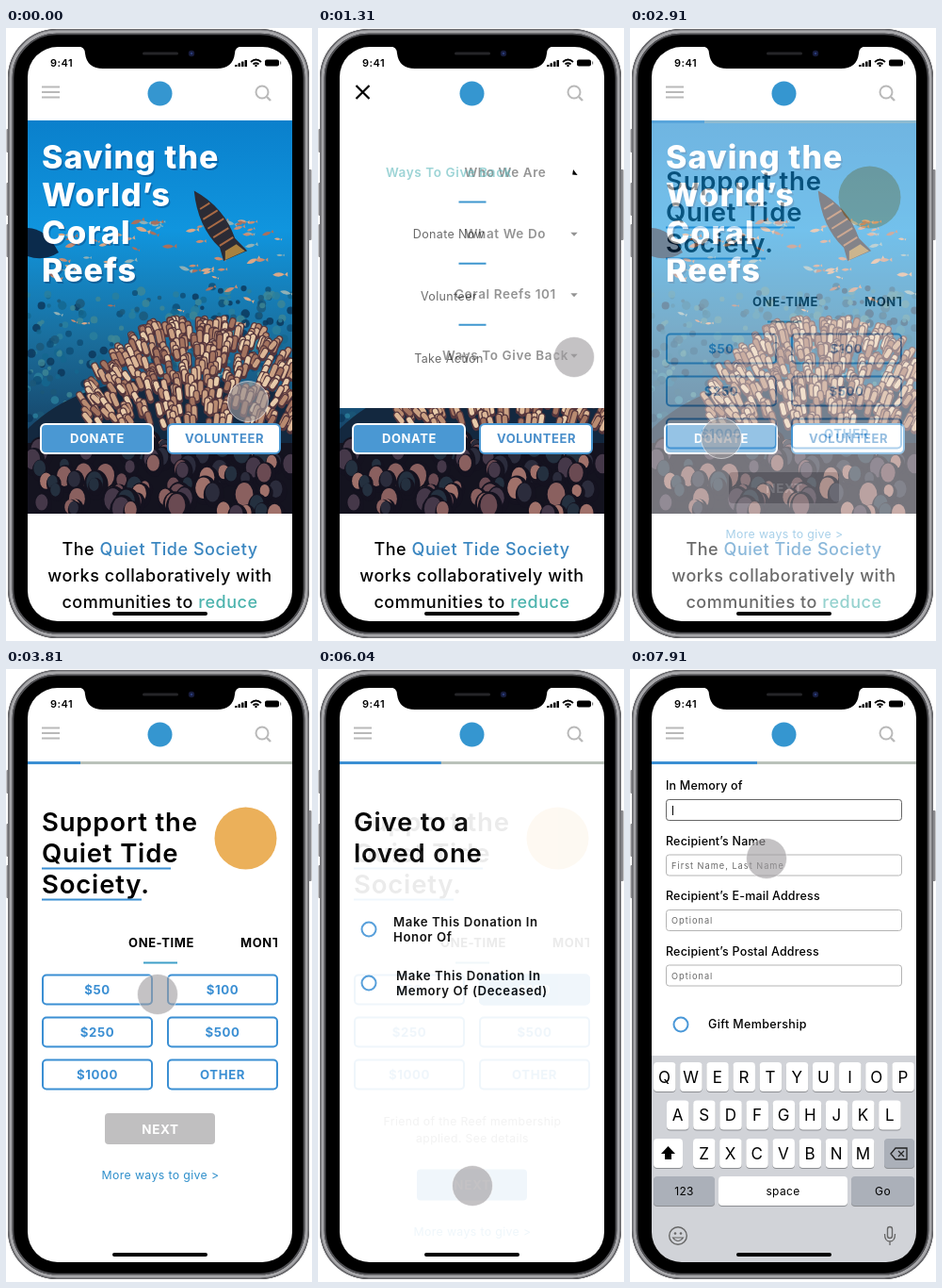
An HTML page for the animation above (7.99 s loop, 325 by 650 pixels).

```html
<!DOCTYPE html>
<html lang="en">
<head>
<meta charset="utf-8">
<title>Reef charity app</title>
<style>
html, body { margin: 0; width: 100%; height: 100%; overflow: hidden; background: #fff; }
svg { display: block; width: 325px; height: 650px; font-family: Inter, "Open Sans", sans-serif; }
text { white-space: pre; }
</style>
</head>
<body>
<script>
const LOOP = 7990, BLUE = '#3b8fd3', GRAY = '#b9b9b9';

// Markup helpers
const text = (x, y, s, size, weight = 400, fill = '#000', anchor = 'start', spacing = weight > 500 ? .045 : .03) =>
  `<text x="${x}" y="${y}" font-size="${size}" font-weight="${weight}" fill="${fill}" text-anchor="${anchor}" letter-spacing="${spacing * size}">${s}</text>`;
const mid = (x, y, s, size, weight, fill) => text(x, y, s, size, weight, fill, 'middle');
const box = (x, y, w, h, fill, r = 0, more = '') =>
  `<rect x="${x}" y="${y}" width="${w}" height="${h}" rx="${r}" fill="${fill}" ${more}/>`;
const dot = (x, y, r, fill, more = '') => `<circle cx="${x}" cy="${y}" r="${r}" fill="${fill}" ${more}/>`;
const line = (d, color, w = 2, more = '') => `<path d="${d}" stroke="${color}" stroke-width="${w}" fill="none" ${more}/>`;
const group = (id, body, more = '') => `<g id="${id}" ${more}>${body}</g>`;
const outlined = (color, w = 2) => `stroke="${color}" stroke-width="${w}"`;
const range = (n, f) => Array.from({ length: n }, (_, i) => f(i)).join('');

let seed = 7;
const rnd = (a, b) => {
  seed = seed * 16807 % 2147483647;
  return a + (b - a) * seed / 2147483647;
};
const pick = list => list[Math.floor(rnd(0, list.length))];

function fish(x, y, size, turn, fill) {
  return `<path transform="translate(${x} ${y}) rotate(${turn}) scale(${size})" fill="${fill}" d="M-1 0Q0-.7 1 0L1.5-.4V.4L1 0Q0 .7-1 0"/>`;
}

function reef() {
  const far = range(420, i => {
    const x = rnd(23, 304), y = 272 + i * .4 + rnd(0, 12);
    return dot(x, y, rnd(2, 5), pick(['#14668f', '#2a7f9c', '#0e4c74', '#3f8795', '#0b3557', '#1b5878']), 'opacity=".8"');
  });
  const school = range(75, () =>
    fish(rnd(28, 300), 205 + rnd(0, 1) * rnd(0, 170), rnd(3, 6.5), rnd(-25, 25), pick(['#c98d72', '#a9705d', '#8fb0b6', '#d9a888'])));
  // Branching coral: short rounded fingers inside a dome, back to front
  const fingers = range(420, i => {
    const y = 308 + i * .26, half = 126 * Math.sqrt(Math.max(.05, 1 - ((415 - y) / 112) ** 2));
    const x = 206 + rnd(-half, half), lean = (x - 206) / 22, h = rnd(6, 12);
    const tone = pick(['#cba183', '#dcb797', '#b88a70', '#a3735f', '#e8cbaa']);
    return line(`M${x} ${y + h}L${x + lean} ${y}`, '#55363c', 7.5, 'stroke-linecap="round"') +
      line(`M${x} ${y + h - 2}L${x + lean} ${y}`, tone, 5, 'stroke-linecap="round"');
  });
  const rocks = range(85, i => {
    const x = rnd(23, 304), y = 438 + i * .95, r = rnd(7, 14);
    return `<ellipse cx="${x}" cy="${y}" rx="${r}" ry="${r * 1.25}" fill="#14121f"/>` +
      `<ellipse cx="${x - 1.5}" cy="${y - 2.5}" rx="${r * .68}" ry="${r * .9}" fill="${pick(['#6a4a52', '#8a605f', '#453849', '#2b2c3c', '#a0716a', '#24303f'])}"/>`;
  });
  const bigFish = `<g transform="translate(222 208) rotate(58)">
    <path d="M-42 0Q-10-18 24-10L42-14 38 13 24 9Q-8 17-42 0" fill="#2b2b35"/>
    <path d="M-22-7V5M-11-10V8M0-11V9M11-10V9M22-9V8" stroke="#a86a45" stroke-width="2"/>
    <path d="M30-8L41-12 38 11 30 6" fill="#a8813f"/></g>`;
  return `<g clip-path="url(#photo)">` + box(23, 98, 281, 417, 'url(#sea)') + far + school +
    '<path d="M23 425Q110 340 304 390V515H23" fill="#13283f"/>' +
    fingers + box(23, 440, 281, 75, '#14131f') + rocks + bigFish +
    '<path d="M23 212Q42 212 56 238 40 248 23 242" fill="#0b2b4c"/></g>';
}

function home() {
  const hero = ['Saving the', 'World’s', 'Coral', 'Reefs'];
  const write = (dx, fill) => hero.map((s, i) => text(38 + dx, 149 + dx + i * 40, s, 34, 800, fill, 'start', .03)).join('');
  const span = (s, c) => `<tspan fill="${c}">${s}</tspan>`;
  return box(23, 20, 281, 610, '#fff') + reef() +
    `<g opacity=".25">${write(1.5, '#003')}</g>` + write(0, '#fff') +
    box(37, 420, 119, 31, '#4a98d3', 5, outlined('#fff')) + mid(97, 440, 'DONATE', 13, 700, '#fff') +
    box(172, 420, 119, 31, '#fff', 5, outlined('#4a98d3')) + mid(232, 440, 'VOLUNTEER', 13, 700, '#4a8fcb') +
    mid(163.5, 559, 'The ' + span('Quiet Tide Society', '#3a86c0'), 18, 500) +
    mid(163.5, 587, 'works collaboratively with', 18, 500) +
    mid(163.5, 615, 'communities to ' + span('reduce', '#4cb3ad'), 18, 500);
}

function menu() {
  const items = ['Who We Are', 'What We Do', 'Coral Reefs 101', 'Ways To Give Back'];
  const links = ['Donate Now', 'Volunteer', 'Take Action'];
  const caret = '<path d="M-3.7-1.7H3.700L0 2.300Z"/>';
  return box(23, 98, 281, 305, '#fff') +
    group('main', items.map((s, i) => mid(164, 158 + i * 64.5, s, 13.5, 600)).join('')) +
    group('carets', range(3, i => `<g transform="translate(272 ${218.5 + i * 64.5})">${caret}</g>`)) +
    group('backCaret', caret) +
    group('sub', mid(164, 158, items[3], 13.5, 600, '#56b5b8') +
      links.map((s, i) => mid(164, 223 + i * 66, s, 12.5)).join('')) +
    line('', '#3f97cf', 2, 'id="rules"');
}

const nextButton = (y, fill) => box(105, y, 117, 33, fill, 4) + mid(164, y + 21.5, 'NEXT', 13.5, 700, '#fff') +
  mid(164, y + 70, 'More ways to give &gt;', 12.3, 400, '#2f8fcb');

function amount(i, s, on) {
  const x = 39 + i % 2 * 133, y = 324.5 + (i >> 1) * 45;
  return box(x, y, 116, 31, on ? BLUE : '#fff', 4, outlined(BLUE)) + mid(x + 58, y + 20, s, 13.2, 700, on ? '#fff' : BLUE);
}

function donate() {
  const sums = ['$50', '$100', '$250', '$500', '$1000', 'OTHER'];
  const lines = ['Support the', 'Quiet Tide', 'Society.'];
  return box(23, 98, 281, 532, '#fff') +
    lines.map((s, i) => text(38, 172 + i * 33, s, 27.5, 600, '#000', 'start', .03)).join('') +
    line('M38 211.5H175M38 244.5H144', BLUE) + dot(254.5, 179.5, 33, '#ebb05a') +
    mid(165, 294.5, 'ONE-TIME', 13, 700) +
    `<g clip-path="url(#tabs)">${text(249, 294.5, 'MONTHLY', 13, 700)}</g>` +
    line('M146 311.5H182', '#3f9fc8') + sums.map((s, i) => amount(i, s)).join('') +
    group('plain', nextButton(471, '#c0bfc0')) +
    group('chosen', box(38, 460, 251, 150, '#fff') + amount(1, '$100', true) +
      mid(164, 484, 'Friend of the Reef membership', 12.2, 400, '#666') +
      mid(164, 502, 'applied. See details', 12.2, 400, '#666') + nextButton(530.5, BLUE));
}

function gift() {
  const radio = y => dot(54, y, 7.5, '#fff', outlined('#4a98d8'));
  const fields = [['In Memory of', 'First Name, Last Name'], ['Recipient’s Name', 'First Name, Last Name'],
    ['Recipient’s E-mail Address', 'Optional'], ['Recipient’s Postal Address', 'Optional']];
  const form = dot(54, 333, 6, '#4392dc') +
    text(83, 364.5, 'We will notify your recipient to let them know', 9, 400, '#777', 'start', .01) +
    text(83, 375, 'of your generous donation.', 9, 400, '#777', 'start', .01) +
    fields.map(([label, hint], i) => {
      const y = i * 58.5;
      return text(38, 404 + y, label, 12.5, 500, '#000', 'start', .015) +
        box(38.5, 414.5 + y, 250, 22, '#fff', 3, outlined('#b4b4b4', 1)) +
        text(44, 429 + y, hint, 9.2, 400, '#666', 'start', .11);
    }).join('') + radio(653) + text(83, 657, 'Gift Membership', 12.5, 500) +
    group('focus', box(38.5, 414.5, 250, 22, '#fff', 3, outlined('#666', 1)) + line('M45.5 421V431', '#000', 1));
  return box(23, 98, 281, 532, '#fff') +
    group('scroll', text(38, 172, 'Give to a', 27.5, 600, '#000', 'start', .03) +
      text(38, 205, 'loved one', 27.5, 600, '#000', 'start', .03) +
      radio(276) + text(80, 273, 'Make This Donation In', 13.2, 600) + text(80, 289, 'Honor Of', 13.2, 600) +
      radio(333) + text(83, 330, 'Make This Donation In', 13.2, 600) +
      text(83, 346, 'Memory Of (Deceased)', 13.2, 600) + group('form', form));
}

function header() {
  return box(23, 20, 281, 78, '#fff') + mid(59, 41, '9:41', 11, 600) +
    range(4, i => box(243 + i * 3.5, 39 - i * 1.7, 2.5, 2 + i * 1.7, '#000', .5)) +
    line('M260 36Q265.5 31 271 36M262.5 38.5Q265.5 36 268.5 38.5', '#000', 1.8) + dot(265.5, 40, 1.2, '#000') +
    box(275, 33.5, 15, 7, '#000', 2) + box(291, 35.5, 1.2, 3, '#777') +
    group('bars', line('M38 62.5H57M38 68H57M38 73.5H57', GRAY)) +
    group('cross', line('M40.5 61L54.5 75M54.5 61L40.5 75', '#000', 2.2)) +
    dot(163.5, 69.5, 13, '#3596d0') + dot(272, 68, 6.5, 'none', outlined(GRAY)) + line('M277 73L281 77', GRAY, 2.4) +
    group('progress', box(23, 98, 281, 3, '#bac2ba') + box(23, 98, 56, 3, BLUE, 0, 'id="bar"'));
}

function keyboard() {
  const key = (x, y, w, s, size = 17, fill = '#fff') =>
    box(x, y + 1, w, 31, '#8c8e92', 4) + box(x, y, w, 31, fill, 4) + mid(x + w / 2, y + 15.5 + size * .36, s, size);
  const row = (letters, x, y) => [...letters].map((c, i) => key(x + i * 28.15, y, 23.5, c)).join('');
  const dark = '#abb0b9';
  return box(23, 410, 281, 220, '#d1d3d8') +
    row('QWERTYUIOP', 25, 417) + row('ASDFGHJKL', 39, 457.5) + row('ZXCVBNM', 67, 498) +
    key(25, 498, 31, '') + '<path d="M40.5 506L48 514H44V520H37V514H33Z"/>' +
    key(270, 498, 32, '', 17, dark) +
    line('M277 514L282 508H294V520H282ZM285 511L291 517M291 511L285 517', '#222', 1.3) +
    key(25, 538, 65, '123', 12, dark) + key(94, 538, 137, 'space', 12) + key(235, 538, 67, 'Go', 12, dark) +
    dot(51, 601, 9.3, 'none', outlined('#666', 1.4)) + dot(48, 598.5, 1.3, '#666') + dot(54, 598.5, 1.3, '#666') +
    line('M45.5 603Q51 610 56.5 603Z', '#666', 1.2) +
    box(273.5, 591.5, 5, 12, 'none', 2.5, outlined('#666', 1.4)) + line('M270.5 599Q270.5 607 276 607T281.5 599M276 607V611', '#666', 1.3);
}

function phone() {
  const rr = (x, y, w, h, r) =>
    `M${x + r} ${y}h${w - 2 * r}a${r} ${r} 0 0 1 ${r} ${r}v${h - 2 * r}a${r} ${r} 0 0 1-${r} ${r}h${2 * r - w}a${r} ${r} 0 0 1-${r}-${r}v${2 * r - h}a${r} ${r} 0 0 1 ${r}-${r}z`;
  return [[0, 107, 25], [0, 164, 35], [0, 208, 35], [320, 150, 75]].map(([x, y, h]) => box(x + .5, y, 4, h, '#8a8a8e', 1)).join('') +
    `<path fill-rule="evenodd" d="${rr(2, 1, 320, 646, 52)}${rr(23, 20, 281, 609, 32)}"/>` +
    box(2.7, 1.7, 318.6, 644.6, 'none', 51, outlined('#6c6c70', 1.4)) +
    box(5, 4, 314, 640, 'none', 49, outlined('#a6a6a9', 3.4)) +
    box(7.5, 6.5, 309, 635, 'none', 46.5, outlined('#505054', 1.6)) +
    '<path d="M76 19Q84 20 84 27 86 43 103 43H224Q241 43 243 27 243 20 251 19Z"/>' +
    box(145, 25.5, 38, 3, '#252528', 1.5) + dot(197, 27, 3.2, '#171c3c') + dot(197, 27, 1.3, '#2a3c78');
}

document.body.innerHTML = `<svg viewBox="0 0 325 650"><defs>
  <linearGradient id="sea" x2="0" y2="1"><stop stop-color="#0a80cc"/><stop offset=".28" stop-color="#1095de"/><stop offset=".55" stop-color="#1a6f9e"/><stop offset="1" stop-color="#14213a"/></linearGradient>
  <clipPath id="screen">${box(23, 20, 281, 609, '#000', 32)}</clipPath>
  <clipPath id="photo">${box(23, 98, 281, 417, '#000')}</clipPath>
  <clipPath id="tabs">${box(38, 280, 250, 24, '#000')}</clipPath></defs>
  <g clip-path="url(#screen)">${home()}${group('menu', menu())}${group('donate', donate())}${group('gift', gift())}
  ${header()}${group('keys', keyboard())}${box(113, 619, 101, 4, '#000', 2)}</g>
  ${phone()}${group('touch', dot(0, 0, 21.5, '#a19da1', 'fill-opacity=".62" stroke="#fff" stroke-opacity=".55"'))}</svg>`;

const el = Object.fromEntries([...document.querySelectorAll('g[id], #rules, #bar')].map(e => [e.id, e]));
const ease = (t, a, b) => {
  const u = Math.min(1, Math.max(0, (t - a) / (b - a)));
  return u * u * (3 - 2 * u);
};
const fade = (id, p) => {
  el[id].style.opacity = p;
  el[id].style.display = p > 0 ? '' : 'none';
};
const move = (id, x, y, more = '') => el[id].setAttribute('transform', `translate(${x} ${y})${more}`);

// Touch point: time, x, y
const path = [[70, 257, 396], [440, 47, 68], [1000, 47, 68], [1190, 272, 349], [1590, 272, 349], [1800, 272, 153],
  [2430, 97, 480], [2680, 97, 435], [3660, 97, 435], [3810, 161, 345], [4430, 190, 380], [4510, 190, 380],
  [5030, 234, 341], [5270, 234, 341], [5660, 164, 548], [6130, 164, 548], [6350, 54, 333], [6750, 54, 333],
  [6910, 134, 433], [7610, 134, 433], [7910, 145, 201]];

function touchAt(t) {
  const i = path.findIndex(k => k[0] > t);
  if (i < 1) return path.at(i).slice(1);
  const [a, b] = [path[i - 1], path[i]], p = ease(t, a[0], b[0]);
  return [1, 2].map(k => a[k] + (b[k] - a[k]) * p);
}

function draw(t) {
  const open = ease(t, 750, 1000) - ease(t, 2220, 2370);
  const sub = ease(t, 1200, 1400) - ease(t, 1830, 2050);
  fade('menu', open > 0 ? 1 : 0);
  move('menu', 0, 305 * (open - 1));
  fade('main', 1 - sub);
  move('main', 60 * sub, 0);
  fade('carets', 1 - sub);
  fade('sub', sub);
  move('sub', -60 * (1 - sub), 0);
  move('backCaret', 272, 154, ` rotate(${90 * sub})`);
  const half = 18 - 6 * sub;
  el.rules.setAttribute('d', [0, 1, 2].map(i =>
    `M${164 - half} ${184 + i * 64.5 + sub * (1 + i)}h${2 * half}`).join(''));
  fade('cross', open > .5 ? 1 : 0);
  fade('bars', open > .5 ? 0 : 1);

  const giving = ease(t, 2800, 3050), next = ease(t, 5850, 6080);
  fade('donate', giving);
  fade('progress', giving);
  fade('chosen', ease(t, 5120, 5370));
  fade('gift', next);
  el.bar.setAttribute('width', 56 + 56 * next);
  fade('form', ease(t, 6400, 6600));

  const typing = ease(t, 6980, 7220);
  move('scroll', 0, -276 * typing);
  fade('keys', typing > 0 ? 1 : 0);
  move('keys', 0, 220 * (1 - typing));
  fade('focus', t >= 7450 ? 1 : 0);

  fade('touch', 1 - ease(t, 2000, 2100) + ease(t, 2430, 2510));
  move('touch', ...touchAt(t));
}

function tick() {
  draw(performance.now() % LOOP);
  requestAnimationFrame(tick);
}
tick();
</script>
</body>
</html>
```
